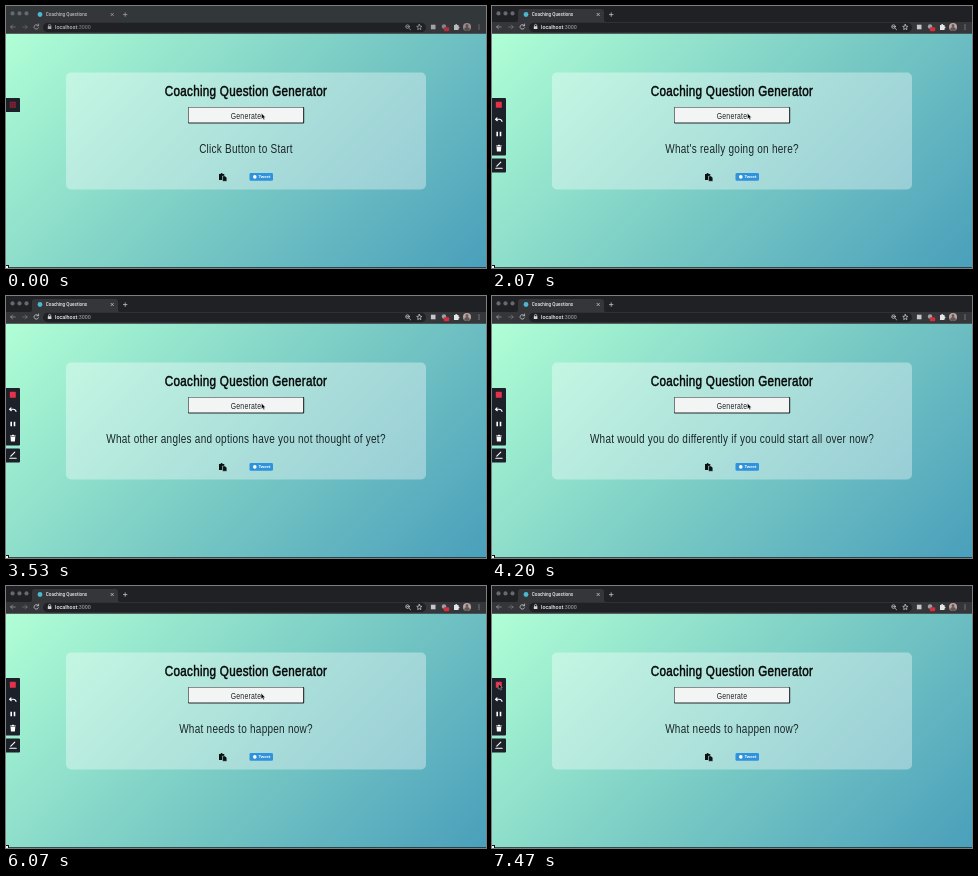
These frames come from a looping animation (480x262 px, 7.67 s). An HTML page:

```html
<!DOCTYPE html>
<html lang="en">
<head>
<meta charset="utf-8">
<title>Coaching Questions</title>
<style>
html, body { margin: 0; width: 100%; height: 100%; overflow: hidden; }
svg { display: block; width: 100%; height: 100%; font-family: "Liberation Sans", Arial, sans-serif; }
.ui { font: 500 5px Roboto, sans-serif; fill: #e8eaed; }
.line { fill: none; stroke: #d5d7da; stroke-width: .7; stroke-linecap: round; stroke-linejoin: round; }
.tool { fill: none; stroke: #fff; stroke-width: 1.1; stroke-linecap: round; stroke-linejoin: round; }
.face { text-anchor: middle; fill: #1a2628; letter-spacing: .33px; }
</style>
</head>
<body>
<svg viewBox="0 0 480 262">
  <defs>
    <linearGradient id="sky" gradientUnits="userSpaceOnUse" x1="61" y1="-34" x2="418" y2="323">
      <stop offset="0" stop-color="#b0ffd6"/>
      <stop offset=".5" stop-color="#7ccdc5"/>
      <stop offset="1" stop-color="#4a9fbb"/>
    </linearGradient>
    <clipPath id="reveal"><rect id="window" y="92" width="15"/></clipPath>
  </defs>

  <rect width="480" height="262" fill="url(#sky)"/>
  <rect y="261.2" width="480" height=".8" fill="#20292b"/>

  <!-- browser bar -->
  <rect id="strip" width="480" height="17"/>
  <path d="M24 16q2 0 2-2V6q0-3 3-3h80q3 0 3 3v8q0 2 2 2h366v11.7H0V16z" fill="#35363a"/>
  <g fill="#66696d">
    <circle cx="6.5" cy="7.4" r="2.1"/><circle cx="13.5" cy="7.4" r="2.1"/><circle cx="20.5" cy="7.4" r="2.1"/>
  </g>
  <circle cx="34" cy="8.5" r="2.4" fill="#49b9cf"/>
  <rect x="37" y="16.8" width="383" height="9.4" rx="4.7" fill="#202124"/>
  <g id="controls">
    <text class="ui" x="39.8" y="10.3" style="font-size:4.6px">Coaching Questions</text>
    <path class="line" d="M105 7.3l2.4 2.4m0-2.4l-2.4 2.4M117.4 8.6h3.6m-1.8-1.8v3.6"/>
    <path class="line" d="M9.2 21H4.6m2-2l-2 2 2 2" stroke-opacity=".65"/>
    <path class="line" d="M16.6 21h4.6m-2-2l2 2-2 2" stroke-opacity=".4"/>
    <path class="line" d="M32.3 19.6a2.3 2.3 0 1 0 .2 2.2M32.6 18v1.8h-1.8"/>
    <path class="line" d="M42.5 20.5v-1a1.1 1.1 0 0 1 2.2 0v1"/>
    <rect x="41.8" y="20.3" width="3.6" height="2.8" rx=".4" fill="#d5d7da"/>
    <text class="ui" x="49" y="22.8" style="font-size:5.4px">localhost<tspan fill="#8b9096">:3000</tspan></text>
    <path class="line" d="M403 22.2l1.6 1.6M400.8 20.6h1.4"/>
    <circle class="line" cx="401.5" cy="20.6" r="1.8"/>
    <path class="line" d="M413.3 18.4l.8 1.8 1.8.2-1.4 1.3.4 1.9-1.6-.9-1.6.9.4-1.9-1.4-1.3 1.8-.2z"/>
    <rect x="424.9" y="18.7" width="4.6" height="4.6" fill="#c5c8cb"/>
    <circle cx="438" cy="20.5" r="2.2" fill="#9da1a6"/>
    <rect x="437.8" y="21.3" width="5.4" height="4" rx="1" fill="#d52f3d"/>
    <path d="M448 19h1.2a1 1 0 1 1 2 0h1.3v1.5a1 1 0 1 1 0 2V24H448z" fill="#e4e6e8"/>
    <circle cx="461" cy="21" r="4" fill="#b9a6a2"/>
    <circle cx="461" cy="19.7" r="1.4" fill="#665657"/>
    <path d="M458.2 23.8a2.8 2.7 0 0 1 5.6 0 4 4 0 0 1-5.6 0" fill="#665657"/>
    <g fill="#d5d7da">
      <circle cx="473" cy="18.9" r=".5"/><circle cx="473" cy="21" r=".5"/><circle cx="473" cy="23.1" r=".5"/>
    </g>
  </g>

  <!-- card -->
  <rect x="60" y="66.5" width="360" height="117" rx="5" fill="#fff" fill-opacity=".36"/>
  <rect x="182" y="100.9" width="116.2" height="16.6" rx="1" fill="#20282a"/>
  <rect x="182.6" y="101.5" width="114.5" height="14.9" rx=".4" fill="#f3f4f4"/>
  <!-- one shared condensed face for the card's text -->
  <g class="face" transform="translate(240) scale(.8 1)">
    <text y="90" font-size="14.6" fill="#050808" stroke="#050808" stroke-width=".5">Coaching Question Generator</text>
    <text y="112.6" font-size="8.6">Generate</text>
    <g font-size="12.5"><text id="first"/><text id="second" y="154"/></g>
  </g>
  <path d="M213 168h1.6a1 1 0 0 1 2 0h1.7v2h-2v4H213z" fill="#0b1213"/>
  <path d="M216.6 170h2.4l1.8 1.8v3.5h-4.2z" fill="#0b1213" stroke="#c0e4e1" stroke-width=".4"/>
  <rect x="243.5" y="167" width="23.5" height="7.8" rx="1.4" fill="#2f92dc"/>
  <circle cx="248.8" cy="170.9" r="1.8" fill="#fff"/>
  <text x="252.4" y="172.4" font-size="4.4" font-weight="bold" fill="#fff">Tweet</text>
  <rect x="-.5" y="259.5" width="3" height="3" fill="#fff" stroke="#111"/>

  <!-- recorder tools -->
  <g clip-path="url(#reveal)">
    <path d="M0 92h13q1 0 1 1v55.6q0 1-1 1H0zM0 152.4h13q1 0 1 1v12.2q0 1-1 1H0z" fill="#1c2028"/>
    <rect id="stop" x="3.8" y="95.8" width="6" height="6" rx=".6"/>
    <path class="tool" d="M5 111.8L3.5 113.3l1.8 1.4M3.8 113.2h3.4q2.4 0 2.8 2.2"/>
    <path class="tool" d="M5.2 125.8v4.4M8.5 125.8v4.4" style="stroke-width:1.6;stroke-linecap:butt"/>
    <path d="M4 139.4h1.7l.5-.7h1.4l.5.7h1.7v.9H4zM4.5 140.8h4.8l-.4 4.7h-4z" fill="#fff"/>
    <path class="tool" d="M4.8 160.2l4-4M3.8 162.2h6.4"/>
  </g>
  <path id="grid" d="M5.8 95.8v6M7.8 95.8v6M3.8 97.8h6M3.8 99.8h6" stroke="#431c28" stroke-width=".6"/>

  <path id="cursor" d="M0 0v5.6l1.3-1.1.9 2 1-.5-.9-1.9H4z" fill="#050505" stroke="#fff" stroke-width=".35"/>
</svg>
<script>
const loop = 7670;
const questions = [
  [0, "Click Button to Start"],
  [1670, "What's really going on here?"],
  [2600, "If you had a free choice in the matter, what would you do to bring the", "change you want?"],
  [3530, "What other angles and options have you not thought of yet?"],
  [4200, "What would you do differently if you could start all over now?"],
  [4870, "What do you think you need to do next?"],
  [5470, "What is the most important thing for you to focus on before next week?"],
  [6070, "What needs to happen now?"]
];
const el = id => document.getElementById(id);
const set = (id, name, value) => el(id).setAttribute(name, value);
const span = (t, from, to) => Math.min(1, Math.max(0, (t - from) / (to - from)));
const easeOut = (u, power) => 1 - (1 - u) ** power;
const mix = (a, b, u) => a + (b - a) * u;

function draw(now) {
  const t = now % loop;
  const active = t >= 70;

  set("strip", "fill", active ? "#202124" : "#323739");
  set("controls", "opacity", active ? 1 : .75);
  set("stop", "fill", active ? "#e4324b" : "#96253a");
  set("grid", "visibility", active ? "hidden" : "visible");
  set("window", "height", mix(14, 75, easeOut(span(t, 70, 380), 2)));

  const [, first, second = ""] = questions.findLast(q => t >= q[0]);
  el("first").textContent = first;
  el("second").textContent = second;
  set("first", "y", second ? 140 : 147);

  const move = easeOut(span(t, 6070, 7330), 1.8);
  set("cursor", "transform", `translate(${mix(255.5, 6.3, move)} ${mix(107.3, 97.6, move)})`);
}

const start = performance.now();
function tick() {
  draw(performance.now() - start);
  requestAnimationFrame(tick);
}
tick();
</script>
</body>
</html>
```
